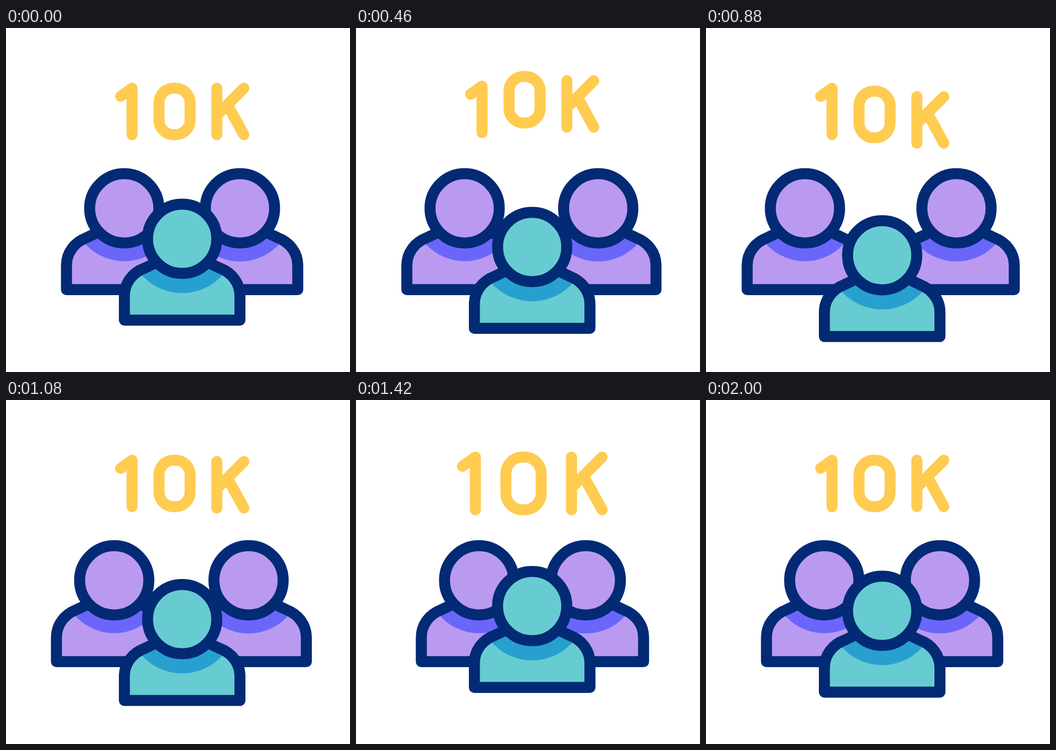
Write an HTML page that moves like this. It is 640 px wide and 640 px high and loops after 2100 ms.

```html
<!DOCTYPE html>
<html lang="en">
<head>
<meta charset="utf-8">
<title>10K followers</title>
<style>
  html, body { margin: 0; width: 100%; height: 100%; overflow: hidden; background: #fff; }
  svg { display: block; width: 100%; height: 100%; }
  .line { fill: none; stroke: #032a75; stroke-width: 20.5; stroke-linejoin: round; }
  .gold { fill: none; stroke: #ffcb50; stroke-width: 20.5; stroke-linecap: round; stroke-linejoin: round; }
</style>
</head>
<body>
<svg viewBox="0 0 640 640">
  <defs>
    <path id="torso" d="M-107.5 151.3V106C-107.5 82 -92 63 -71 55L-50 45H50L71 55C92 63 107.5 82 107.5 106V151.3Z"/>
    <clipPath id="inside"><use href="#torso"/></clipPath>
  </defs>
  <g id="people"></g>
  <g id="count" class="gold">
    <path d="M213.3 127L234.5 112V198.5"/>
    <rect x="284.7" y="112" width="57.8" height="86.5" rx="27"/>
    <path d="M392.3 112V198.5M442.5 112L392.3 162.3M412.8 144.5L442.5 198.5"/>
  </g>
  <g id="rays" class="gold"></g>
</svg>
<script>
const LOOP = 2100, STEP = 20, MID_X = 327.75, MID_Y = 155.3;
const $ = id => document.getElementById(id);

function add(parent, tag, attrs) {
  const el = document.createElementNS('http://www.w3.org/2000/svg', tag);
  for (const k in attrs) el.setAttribute(k, attrs[k]);
  return parent.appendChild(el);
}

// Linear value from [time, value] keys
function at(keys, t) {
  if (t <= keys[0][0]) return keys[0][1];
  for (let i = 1; i < keys.length; i++) {
    const [t0, v0] = keys[i - 1], [t1, v1] = keys[i];
    if (t < t1) return v0 + (v1 - v0) * (t - t0) / (t1 - t0);
  }
  return keys[keys.length - 1][1];
}

const sway = (out, back) => [[206, 0], [806, out], [1404, back], [2000, 0]];
const hop = (start, top, low, end) => [[start, 0], [top, -28], [low, 18.4], [end, 0]];

function person(x, y, dx, dy, skin, shade, shadeR, keys) {
  const g = add($('people'), 'g', {});
  add(g, 'use', { href: '#torso', fill: skin });
  add(g, 'circle', { r: shadeR, fill: shade, 'clip-path': 'url(#inside)' });
  add(g, 'use', { href: '#torso', class: 'line' });
  add(g, 'circle', { r: 64.4, class: 'line', style: 'fill:' + skin });
  return t => {
    const d = at(keys, t);
    g.setAttribute('transform', `translate(${x + dx * d} ${y + dy * d})`);
  };
}

const people = [
  person(220, 335.5, 1, 0, '#ba9af1', '#6b66fa', 98.3, sway(-42.3, 9.3)),
  person(435.3, 335.5, 1, 0, '#ba9af1', '#6b66fa', 98.8, sway(36.2, -8)),
  person(MID_X, 392.2, 0, 1, '#67ccd1', '#28a0cf', 101, sway(36.2, -9))
];

const hops = [hop(50, 318, 590, 810), hop(190, 424, 695, 961), hop(355, 565, 841, 1117)];
const pulse = [[1120, 1], [1413, 1.14], [1707, 0.88], [2000, 1]];
const head = [[1490, 0], [1702, 1]];
const tail = [[1704, 0], [1915, 1]];

// Inner end to outer end, mirrored to the other side
const rays = [];
for (const [x1, y1, x2, y2] of [
  [144.7, 111.5, 113.5, 90], [138.7, 151.8, 99.5, 151.8], [144.7, 191.7, 113.5, 213.5]
]) for (const flip of [false, true]) {
  const mx = x => flip ? 2 * MID_X - x : x;
  rays.push({ el: add($('rays'), 'path', {}), x1: mx(x1), y1, x2: mx(x2), y2 });
}

function draw(t) {
  people.forEach(move => move(t));

  const s = at(pulse, t), count = $('count');
  count.setAttribute('transform',
    `translate(${MID_X} ${MID_Y}) scale(${s}) translate(${-MID_X} ${-MID_Y})`);
  count.style.strokeWidth = 20.5 / s;
  hops.forEach((keys, i) =>
    count.children[i].setAttribute('transform', `translate(0 ${at(keys, t)})`));

  const a = at(tail, t), b = at(head, t);
  $('rays').style.display = b > a ? '' : 'none';
  for (const r of rays) {
    const p = k => `${r.x1 + (r.x2 - r.x1) * k} ${r.y1 + (r.y2 - r.y1) * k}`;
    r.el.setAttribute('d', `M${p(a)}L${p(b)}`);
  }
}

const start = performance.now();
function tick() {
  const t = (performance.now() - start) % LOOP;
  draw(Math.floor(t / STEP) * STEP);
  requestAnimationFrame(tick);
}
tick();
</script>
</body>
</html>
```
